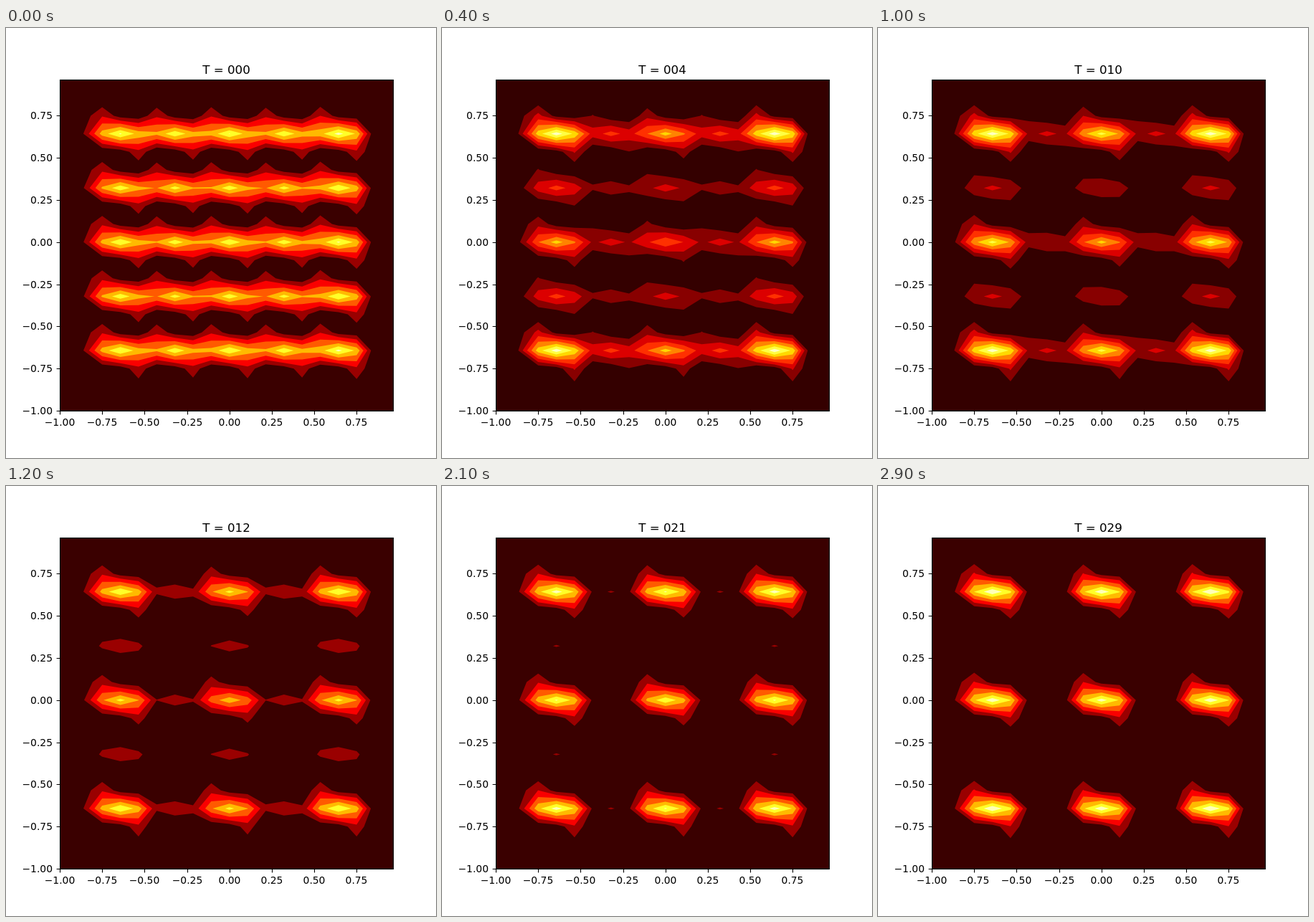
An HTML page with a canvas that plays this animation: 600 px wide and 600 px high, repeating every 3000 ms.

```html
<!DOCTYPE html>
<html>
<head>
<meta charset="utf-8">
<style>
  html, body { margin: 0; width: 100%; height: 100%; overflow: hidden; background: #fff; }
  canvas { display: block; width: 600px; height: 600px; }
</style>
</head>
<body>
<canvas id="plot" width="600" height="600"></canvas>
<script>
const ctx = document.getElementById('plot').getContext('2d');

// Plot units are 1/28 of the axis unit, from -28 to 27.
const px = u => 75 + (u + 28) * 465 / 55;
const py = u => 534 - (u + 28) * 462 / 55;

// Sample positions: a 3 x 3 block around each of 5 x 5 peaks, plus an empty border.
const nodes = [-25, ...Array.from({ length: 15 }, (_, i) => 3 * i - 21), 24];

// Peak profile by [row offset + 1][column offset + 1].
const profile = [[0, 0.05, 0.28], [0.73, 1, 0.76], [0.31, 0.08, 0.035]];

// Time, corner peak height, relative height of odd peaks and of centre peaks.
const keys = [
  [0, 24.5, 0.95, 0.99], [2, 23.4, 0.62, 0.79], [4, 22.8, 0.45, 0.72],
  [7, 21.3, 0.367, 0.775], [12, 24.1, 0.262, 0.885], [17, 25.2, 0.18, 0.925],
  [21, 26, 0.162, 0.945], [29, 27.5, 0.11, 0.97]
];

function stateAt(T) {
  const i = Math.max(1, keys.findIndex(k => k[0] >= T));
  const a = keys[i - 1], b = keys[i], f = (T - a[0]) / (b[0] - a[0]);
  return [1, 2, 3].map(n => a[n] * (b[n] / a[n]) ** f);
}

function fieldAt(T) {
  const [height, odd, centre] = stateAt(T);
  const early = Math.exp(-T / 1.5);
  const weight = [1, odd, centre, odd, 1];
  const cols = weight.map((w, i) => w * (i === 4 ? 1 + 0.045 * early : 1));
  const rows = weight.map((w, j) => w * (1 - [0.015, 0.02, 0.025, 0.02, 0][j] * early));
  return nodes.map((_, r) => nodes.map((_, c) => {
    if (r % 16 === 0 || c % 16 === 0) return 0;
    const j = Math.floor((r - 1) / 3), i = Math.floor((c - 1) / 3);
    return height * cols[i] * rows[j] * profile[(r - 1) % 3][(c - 1) % 3];
  }));
}

function hot(x) {
  const ramp = (from, to) => Math.round(255 * Math.min(1, Math.max(0, (x - from) / (to - from))));
  return `rgb(${ramp(-0.01585, 0.365079)},${ramp(0.365079, 0.746032)},${ramp(0.746032, 1)})`;
}

function addPolygon(points) {
  points.forEach(([x, y], i) => i ? ctx.lineTo(x, y) : ctx.moveTo(x, y));
  ctx.closePath();
}

// Adds the part of one grid cell that lies above the level.
function addCell(corners, level) {
  const cross = (a, b) => {
    const f = (level - a.v) / (b.v - a.v);
    return [a.x + f * (b.x - a.x), a.y + f * (b.y - a.y)];
  };
  const above = corners.map(p => p.v > level);
  const mean = corners.reduce((sum, p) => sum + p.v, 0) / 4;
  const saddle = above[0] === above[2] && above[1] === above[3] && above[0] !== above[1];
  if (saddle && mean < level) {
    corners.forEach((p, i) => {
      if (above[i]) addPolygon([cross(corners[(i + 3) % 4], p), [p.x, p.y], cross(p, corners[(i + 1) % 4])]);
    });
    return;
  }
  const points = [];
  corners.forEach((p, i) => {
    const next = (i + 1) % 4;
    if (above[i]) points.push([p.x, p.y]);
    if (above[i] !== above[next]) points.push(cross(p, corners[next]));
  });
  if (points.length) addPolygon(points);
}

function drawContours(T) {
  const field = fieldAt(T);
  const top = Math.max(...field.flat());
  const step = top > 24 ? 4 : 3;
  const layers = Math.ceil(top / step);
  const corner = (r, c) => ({ x: px(nodes[c]), y: py(nodes[r]), v: field[r][c] });

  ctx.fillStyle = hot(0.5 / layers);
  ctx.fillRect(75, 72, 465, 462);
  for (let k = 1; k < layers; k++) {
    ctx.beginPath();
    for (let r = 0; r < 16; r++) {
      for (let c = 0; c < 16; c++) {
        addCell([corner(r, c), corner(r, c + 1), corner(r + 1, c + 1), corner(r + 1, c)], k * step);
      }
    }
    ctx.fillStyle = hot((k + 0.5) / layers);
    ctx.fill();
  }
}

function drawAxes(T) {
  ctx.fillStyle = ctx.strokeStyle = '#000';
  ctx.lineWidth = 1.11;
  ctx.strokeRect(75.5, 72.5, 465, 462);
  ctx.font = '13.89px "DejaVu Sans", sans-serif';
  ctx.beginPath();
  for (let k = 0; k < 8; k++) {
    const value = k / 4 - 1;
    const label = value.toFixed(2).replace('-', '\u2212');
    const x = Math.round(px(value * 28)) + 0.5, y = Math.round(py(value * 28)) + 0.5;
    ctx.moveTo(x, 535);
    ctx.lineTo(x, 539.4);
    ctx.moveTo(75, y);
    ctx.lineTo(70.6, y);
    ctx.textAlign = 'center';
    ctx.fillText(label, x - 0.5, 555);
    ctx.textAlign = 'right';
    ctx.fillText(label, 65, y + 4.5);
  }
  ctx.stroke();
  ctx.textAlign = 'center';
  ctx.font = '16.67px "DejaVu Sans", sans-serif';
  ctx.fillText('T = ' + String(T).padStart(3, '0'), 307.5, 64);
}

function draw(now) {
  const T = Math.floor(now / 100) % 30;
  ctx.fillStyle = '#fff';
  ctx.fillRect(0, 0, 600, 600);
  drawContours(T);
  drawAxes(T);
  requestAnimationFrame(draw);
}
requestAnimationFrame(draw);
</script>
</body>
</html>
```
